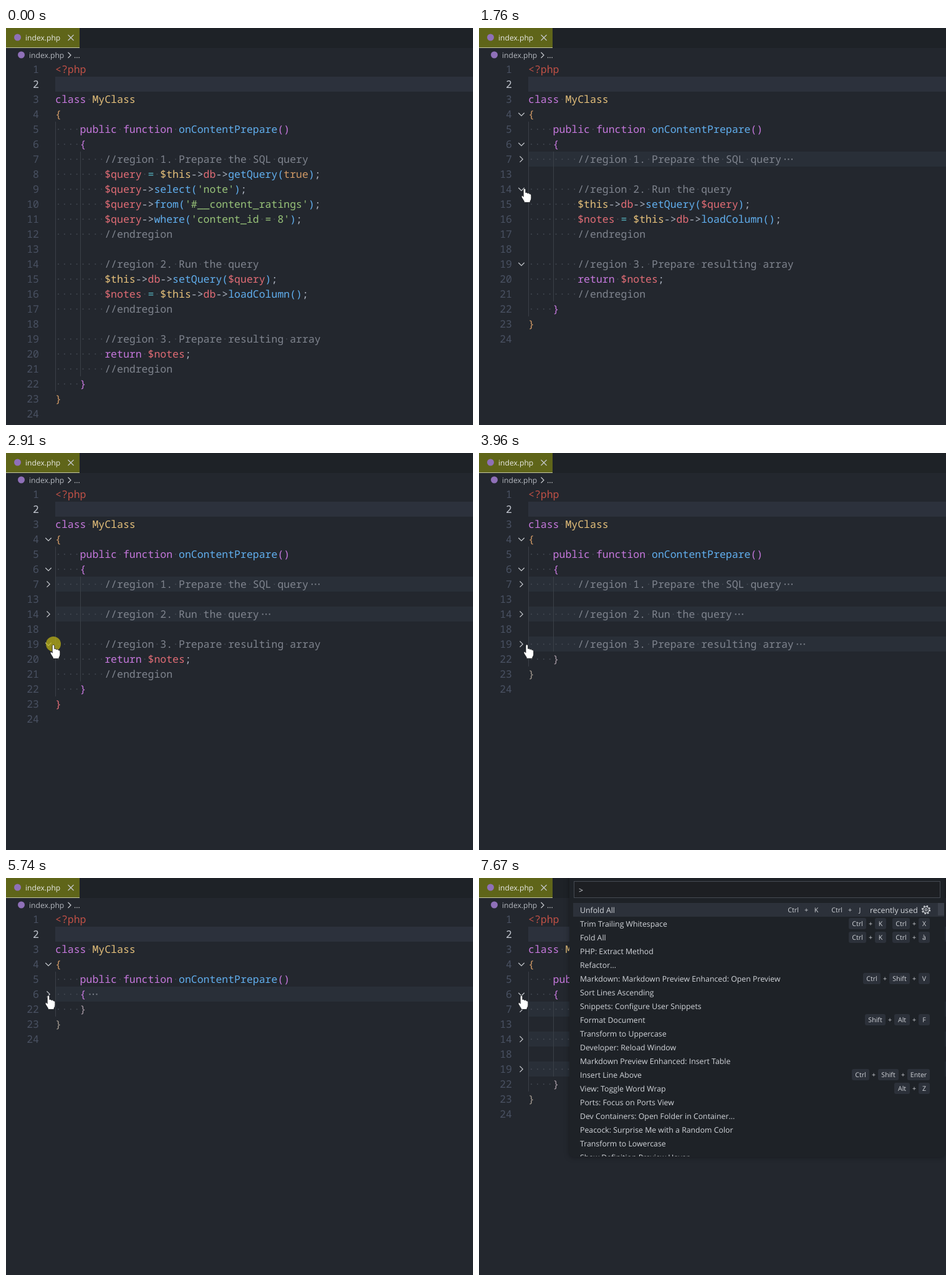
Write an HTML page that moves like this. It is 749 px wide and 636 px high and loops after 8000 ms.

```html
<!DOCTYPE html>
<html lang="en">
<head>
<meta charset="utf-8">
<title>Code folding</title>
<style>
  html, body { margin: 0; width: 100%; height: 100%; overflow: hidden; background: #23272e; }
  svg { display: block; }
  text { text-rendering: geometricPrecision; white-space: pre; }
  .code { font: 16.5px "Noto Sans Mono", monospace; }
  .ui { font: 12.3px "Open Sans", sans-serif; fill: #d3d6db; }
  .key { font: 10.6px "Open Sans", sans-serif; fill: #d0d3d8; text-anchor: middle; }
  .line { fill: none; stroke: #c5c8cd; stroke-width: 1.2; }
</style>
</head>
<body>
<script>
const LOOP = 8000, ROW = 24, TOP = 54, LEFT = 79, CHAR = 9.9;
const color = {
  comment: '#7f848e', string: '#98c379', tag: '#be5046', keyword: '#c678dd', type: '#e5c07b',
  variable: '#e06c75', method: '#61afef', literal: '#d19a66', operator: '#56b6c2', plain: '#abb2bf'
};
const bracketColors = [color.literal, color.keyword, color.method];

const source = `<?php

class MyClass
{
    public function onContentPrepare()
    {
        //region 1. Prepare the SQL query
        $query = $this->db->getQuery(true);
        $query->select('note');
        $query->from('#__content_ratings');
        $query->where('content_id = 8');
        //endregion

        //region 2. Run the query
        $this->db->setQuery($query);
        $notes = $this->db->loadColumn();
        //endregion

        //region 3. Prepare resulting array
        return $notes;
        //endregion
    }
}
`.split('\n');

const tokenPattern = new RegExp([
  /(?<comment>\/\/.*)/, /(?<string>'.*?')/, /(?<tag><\?php)/,
  /(?<keyword>\b(?:class|public|function|return)\b)/, /(?<type>\$this|MyClass)/,
  /(?<variable>\$\w+|\bdb\b)/, /(?<method>\w+(?=\())/, /(?<literal>\btrue\b)/,
  /(?<operator>=(?= ))/, /(?<bracket>[(){}])/, /(?<plain>->|;)/
].map(r => r.source).join('|'), 'g');

const folds = [
  { row: 7, end: 12, from: 1300, to: LOOP },
  { row: 14, end: 17, from: 2030, to: LOOP },
  { row: 19, end: 21, from: 3040, to: LOOP },
  { row: 6, end: 21, from: 5350, to: 6070 }
];
const foldable = [4, 6, 7, 14, 19];
const caretToggles = [1090, 1630, 2130, 2640, 3170, 3700, 4230, 4740, 5280, 5740, 6200, 6730];
const presses = [[1160, 1300], [1960, 2160], [2910, 3040], [5210, 5350], [5940, 6070]];

// start, end, steps, destination x, y
const pointerStart = [585, 600];
const moves = [
  [70, 820, 12, 72, 212],
  [1560, 1760, 4, 73, 256],
  [2360, 2760, 6, 76, 306],
  [3960, 4200, 4, 81, 304],
  [4270, 4740, 8, 66, 209],
  [4860, 4860, 1, 68, 138],
  [4930, 4930, 1, 68, 187]
];

function el(tag, attrs, parent, content) {
  const node = document.createElementNS('http://www.w3.org/2000/svg', tag);
  for (const name in attrs) node.setAttribute(name, attrs[name]);
  if (content) node.textContent = content;
  parent.append(node);
  return node;
}
const rect = (parent, x, y, width, height, fill, more) =>
  el('rect', { x, y, width, height, fill, ...more }, parent);
const label = (parent, x, y, content, cls = 'ui', more) =>
  el('text', { x, y, class: cls, ...more }, parent, content);
const show = (node, visible) => node.setAttribute('visibility', visible ? 'inherit' : 'hidden');

const stage = el('svg', { width: 749, height: 636, viewBox: '0 0 749 636' }, document.body);

function drawHeader() {
  rect(stage, 0, 0, 749, 32, '#1e2227');
  rect(stage, 0, 0, 118, 32, '#5f6519');
  rect(stage, 0, 31, 118, 1, '#c4c8a0');
  el('circle', { cx: 18.5, cy: 15, r: 5.5, fill: '#8f70b8' }, stage);
  label(stage, 31, 20, 'index.php', 'ui', { style: 'font-size:12.1px;fill:#e8e9e4' });
  el('path', { d: 'M99.5 11l9 9m0-9l-9 9', class: 'line' }, stage);
  el('circle', { cx: 24.5, cy: 43, r: 5.5, fill: '#8f70b8' }, stage);
  label(stage, 37, 48, 'index.php', 'ui', { style: 'font-size:12.1px;fill:#b4b8bf' });
  el('path', { d: 'M99.5 39l4.5 4.5l-4.5 4.5', class: 'line' }, stage);
  label(stage, 109, 48, '...');
}

let depth = 0;
function drawWords(group, text, column, fill) {
  for (const word of text.matchAll(/\S+/g))
    label(group, LEFT + (column + word.index) * CHAR, 18, word[0], 'code', { fill });
}
function drawCode(group, text) {
  for (const match of text.matchAll(/ /g))
    rect(group, LEFT + (match.index + .5) * CHAR - .8, 11.5, 1.6, 1.6, '#484d57');
  for (const match of text.matchAll(tokenPattern)) {
    const kind = Object.keys(match.groups).find(k => match.groups[k] !== undefined);
    let fill = color[kind];
    if (kind === 'bracket') {
      const closing = ')}'.includes(match[0]);
      if (closing) depth--;
      fill = bracketColors[depth];
      if (!closing) depth++;
    }
    drawWords(group, match[0], match.index, fill);
  }
}

function drawRow(text, i) {
  const number = i + 1;
  const group = el('g', {}, stage);
  const row = { number, group };
  if (number === 2) rect(group, LEFT, 0, 670, ROW, '#2c313c');
  const fold = folds.find(f => f.row === number);
  if (fold) {
    row.folded = el('g', {}, group);
    rect(row.folded, LEFT, 0, 670, ROW, '#292f38');
    const end = LEFT + text.length * CHAR;
    for (let k = 0; k < 3; k++)
      rect(row.folded, end + 5 + k * 5.5, 11.3, 2, 2, color.comment);
  }
  if (number > 4 && number < 23) rect(group, LEFT, 0, 1, ROW, '#3b4048');
  if (number > 6 && number < 22) rect(group, 119, 0, 1, ROW, '#3b4048');
  label(group, 53, 18, String(number), 'code',
    { 'text-anchor': 'end', fill: number === 2 ? '#c3c8d1' : '#495162' });
  drawCode(group, text);
  if (foldable.includes(number)) row.chevron = el('path', { class: 'line' }, group);
  return row;
}

function drawKeys(group, keys, right, center) {
  const widths = { Ctrl: 28, Shift: 33, Alt: 25, Enter: 36 };
  let x = right;
  keys.split(' ').reverse().forEach((chord, c) => {
    if (c) x -= 10;
    chord.split('+').reverse().forEach((key, k) => {
      if (k) {
        label(group, x - 7, center + 4, '+', 'key');
        x -= 14;
      }
      const width = widths[key] || 18;
      x -= width;
      rect(group, x, center - 9, width, 18, '#2c313a', { rx: 3 });
      label(group, x + width / 2, center + 4, key, 'key');
    });
  });
}

function drawPalette() {
  const commands = [
    ['Unfold All', 'Ctrl+K Ctrl+J'], ['Trim Trailing Whitespace', 'Ctrl+K Ctrl+X'],
    ['Fold All', 'Ctrl+K Ctrl+à'], ['PHP: Extract Method'], ['Refactor...'],
    ['Markdown: Markdown Preview Enhanced: Open Preview', 'Ctrl+Shift+V'],
    ['Sort Lines Ascending'], ['Snippets: Configure User Snippets'],
    ['Format Document', 'Shift+Alt+F'], ['Transform to Uppercase'],
    ['Developer: Reload Window'], ['Markdown Preview Enhanced: Insert Table'],
    ['Insert Line Above', 'Ctrl+Shift+Enter'], ['View: Toggle Word Wrap', 'Alt+Z'],
    ['Ports: Focus on Ports View'], ['Dev Containers: Open Folder in Container...'],
    ['Peacock: Surprise Me with a Random Color'], ['Transform to Lowercase'],
    ['Show Definition Preview Hover']
  ];
  const group = el('g', {}, stage);
  const clip = el('clipPath', { id: 'list' }, group);
  rect(clip, 145, 0, 604, 446, '#000');
  rect(group, 145, -8, 602, 455, '#1e2227',
    { rx: 6, style: 'filter:drop-shadow(0 0 4px rgba(0,0,0,.36))' });
  rect(group, 152.5, 5.5, 587, 26, '#1d1f23', { stroke: '#454a52' });
  label(group, 160, 24, '>');
  const list = el('g', { 'clip-path': 'url(#list)' }, group);
  rect(list, 151, 40, 595, 22, '#2c313a');
  commands.forEach(([name, keys], i) => {
    const center = 51 + i * 22;
    label(list, 162, center + 5, name);
    if (keys) drawKeys(list, keys, i ? 723 : 620, center);
  });
  label(list, 627, 56, 'recently used');
  el('circle', { cx: 717, cy: 51, r: 6, class: 'line', 'stroke-dasharray': '2.4 2.31',
    style: 'stroke-width:2.4' }, list);
  el('circle', { cx: 717, cy: 51, r: 4.8, class: 'line' }, list);
  el('circle', { cx: 717, cy: 51, r: 1.8, class: 'line' }, list);
  return {
    group,
    scrollbar: rect(group, 736, 40, 10, 20, '#3b404a'),
    caret: rect(group, 167, 10, 1, 17, '#d3d6db')
  };
}

drawHeader();
const rows = source.map(drawRow);
const braces = [22, 23].map(n => rows[n - 1].group.querySelector('text:last-of-type'));
const caret = rect(stage, LEFT, 78, 2, ROW, '#528bff');
const halo = el('circle', { r: 12, fill: '#b9b017', opacity: .75 }, stage);
const pointer = el('g', {}, stage);
const hand = el('path', {
  d: 'M-1.8 2Q0-1 1.8 2V7.3Q4 6.2 4.8 8.4Q6.8 7 8 9.3Q10.4 8.5 10.8 11.5V16Q10.8 19 9 21V23H-.6V21.2' +
     'L-4.8 14.5Q-5.4 11.5-3.2 12L-1.8 13.8Z',
  fill: '#fff', stroke: '#15171b', 'stroke-width': .8, transform: 'translate(0 .5)'
}, pointer);
const beam = el('path', { d: 'M-4-8.5H-1Q0-8.5 0-7.5Q0-8.5 1-8.5H4M0-7.5V7.5M-4 8.5H-1Q0 8.5 0 7.5Q0 8.5 1 8.5H4',
  fill: 'none', stroke: '#e8e8e8' }, pointer);
const palette = drawPalette();

function pointerAt(t) {
  let [x, y] = pointerStart;
  for (const [start, end, steps, toX, toY] of moves) {
    if (t < start) break;
    const step = Math.floor((t - start) / Math.max(end - start, 1) * (steps - 1)) + 1;
    const p = Math.min(step, steps) / steps;
    const eased = p * p * (3 - 2 * p);
    x += (toX - x) * eased;
    y += (toY - y) * eased;
  }
  return [x, y];
}

function render(t) {
  const active = folds.filter(f => t >= f.from && t < f.to);
  const chevronOpacity = Math.min(1, Math.max(0, (t - 700) / 480));
  let index = 0;
  for (const { number, group, folded, chevron } of rows) {
    const hidden = active.some(f => number > f.row && number <= f.end);
    group.setAttribute('display', hidden ? 'none' : 'inline');
    if (hidden) continue;
    group.setAttribute('transform', `translate(0 ${TOP + ROW * index++})`);
    const closed = active.some(f => f.row === number);
    if (folded) show(folded, closed);
    if (chevron) {
      chevron.setAttribute('d', closed ? 'M65.5 7.5l4.7 4.7l-4.7 4.7' : 'M63.3 10l4.7 4.7l4.7-4.7');
      chevron.setAttribute('opacity', closed ? 1 : chevronOpacity);
    }
  }
  braces[0].setAttribute('fill', t < 3040 ? color.keyword : '#a598a3');
  braces[1].setAttribute('fill', t < 2030 ? color.literal : t < 3040 ? color.variable : '#a39a90');

  const [x, y] = pointerAt(t);
  pointer.setAttribute('transform', `translate(${x} ${y})`);
  halo.setAttribute('transform', `translate(${x} ${y})`);
  show(pointer, t >= 70);
  show(hand, x < 84);
  show(beam, x >= 84);
  show(halo, presses.some(([from, to]) => t >= from && t < to));
  show(caret, caretToggles.filter(at => at <= t).length % 2);
  show(palette.group, t >= 7130);
  show(palette.scrollbar, t >= 7270);
  show(palette.caret, t < 7670);
}

const began = performance.now();
function tick() {
  render((performance.now() - began) % LOOP);
  requestAnimationFrame(tick);
}
tick();
</script>
</body>
</html>
```
